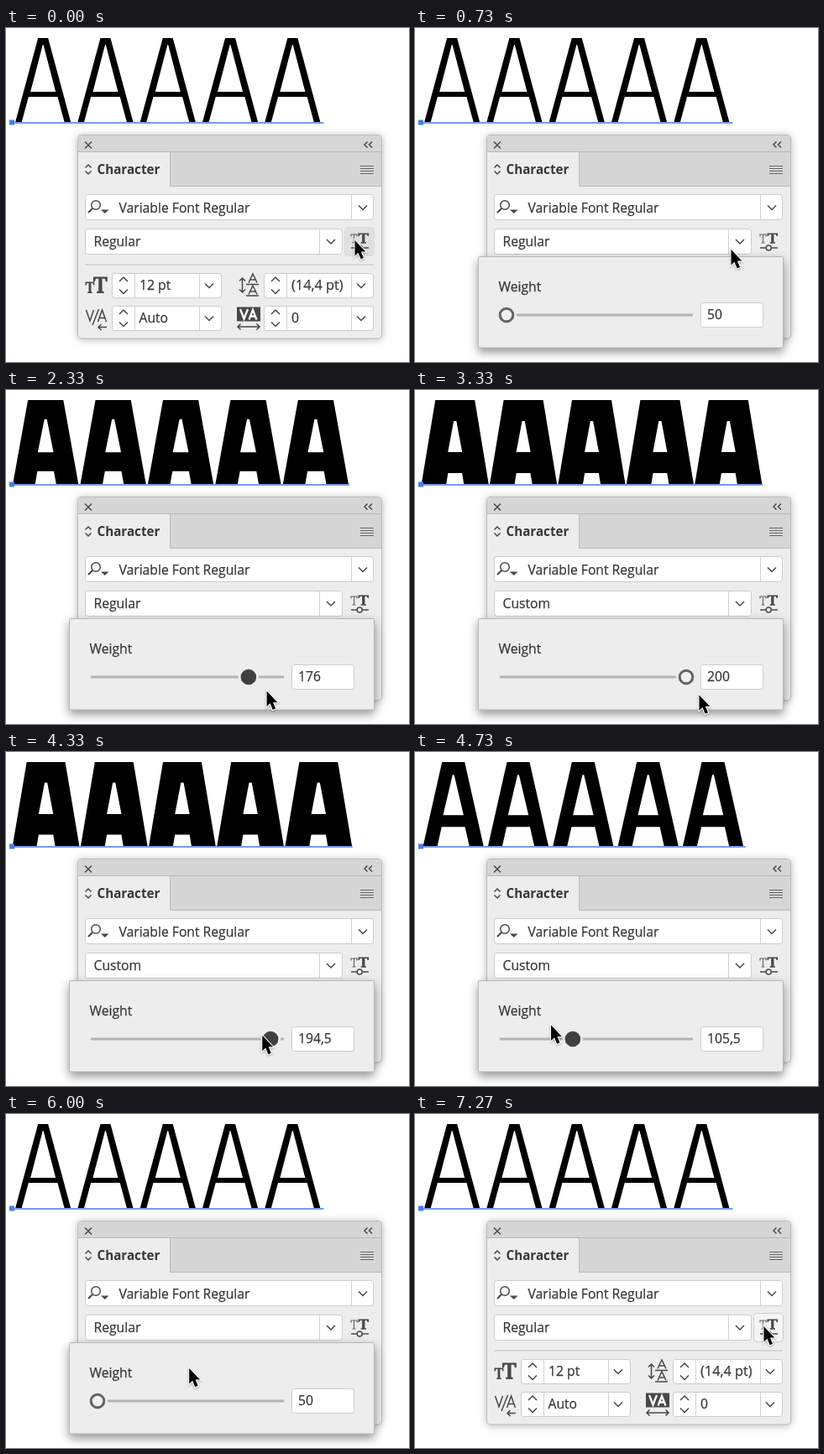
These frames come from a looping animation (480 px wide and 398 px high, 8.27 s). An HTML page:

```html
<!DOCTYPE html>
<html lang="en">
<head>
<meta charset="utf-8">
<title>Variable font weight slider</title>
<style>
  html, body { margin: 0; width: 100%; height: 100%; overflow: hidden; background: #fff; }
  svg { display: block; width: 480px; height: 398px; }
  text { font: 15.7px "Open Sans", "Noto Sans", sans-serif; fill: #383838; stroke: #383838; stroke-width: .25; }
  .bold { font-weight: 700; font-size: 15.2px; stroke: none; }
  .box { fill: #fff; stroke: #cdcdcd; }
  .rule { stroke: #d2d2d2; fill: none; }
  .line { stroke: #484848; fill: none; stroke-width: 1.5; }
  .thin { stroke: #666; stroke-width: 1.2; }
  .panel { filter: drop-shadow(0 1px 5px rgba(0, 0, 0, .28)); }
  #popup { filter: drop-shadow(0 5px 6px rgba(0, 0, 0, .42)); }
  #cursor { filter: drop-shadow(0 1px 1px rgba(0, 0, 0, .3)); }
</style>
</head>
<body>
<svg viewBox="0 0 480 398" xmlns="http://www.w3.org/2000/svg">
  <defs>
    <path id="down" class="line" d="M-5 -2.5L0 2.5L5 -2.5"/>
    <path id="slab" fill="#484848" d="M0 0H14V5H12.500L11.500 2H8.800V15H10.500V17H3.500V15H5.200V2H2.500L1.500 5H0Z"/>
    <path id="a" class="line" d="M-5 10.500L0 0L5 10.500M-3 7H3"/>
    <g id="field">
      <rect class="box" x=".5" y=".5" width="130" height="29" rx="3"/>
      <path class="rule" d="M27.500 1V29M104.500 1V29"/>
      <path class="line" d="M9 10L14 5L19 10M9 19.500L14 24.500L19 19.500"/>
      <use href="#down" x="116" y="15"/>
    </g>
  </defs>

  <path id="letters" fill-rule="evenodd"/>
  <path id="base" stroke="#4878e6" stroke-width="1.500"/>
  <rect x="4" y="109.500" width="6" height="6" fill="#4a7be8"/>

  <rect class="panel" x="85" y="127" width="363" height="243.500" rx="5" fill="#bcbcbc"/>
  <rect x="86" y="128" width="361" height="241.500" rx="4" fill="#ededed"/>
  <path d="M86 188V133Q86 128 91 128H442Q447 128 447 133V188Z" fill="#d6d6d6"/>
  <rect x="86" y="148" width="109" height="41" fill="#ededed"/>
  <path d="M86 147.500H447M195.500 148V188.500H447" stroke="#b9b9b9" fill="none"/>
  <path class="line" d="M94 135.500L102 143.500M102 135.500L94 143.500M430.500 135.500L427 139L430.500 142.500M436 135.500L432.500 139L436 142.500"/>
  <path class="line" d="M94.500 166.500L98 163L101.500 166.500M94.500 170.500L98 174L101.500 170.500"/>
  <path class="line thin" d="M422 164.500H438M422 167.500H438M422 170.500H438M422 173.500H438"/>
  <text class="bold" x="108.500" y="174">Character</text>

  <rect class="box" x="94.500" y="198.500" width="343" height="30" rx="3"/>
  <path class="rule" d="M411.500 199V228"/>
  <circle class="line" cx="107" cy="211" r="5.300"/>
  <path class="line" d="M103 215L98 220" style="stroke-width:2.200"/>
  <path d="M113 216.500H122.500L117.750 221Z" fill="#484848"/>
  <text x="134.500" y="220">Variable Font Regular</text>
  <use href="#down" x="425" y="214"/>

  <rect class="box" x="94.500" y="239.500" width="306" height="30" rx="3"/>
  <path class="rule" d="M373.500 240V269"/>
  <text id="style" x="104.500" y="260"></text>
  <use href="#down" x="387" y="254.500"/>

  <rect id="button" x="403.500" y="237.500" width="35" height="34" rx="4"/>
  <path class="line thin" d="M411 248.500V246H418V248.500M414.500 246V256M412.500 256H416.500"/>
  <use href="#slab" transform="translate(419.500 244.500) scale(.9 .72)"/>
  <path class="line" d="M411 262H418M424.500 262H432"/>
  <circle class="line" cx="421.200" cy="262" r="3"/>

  <path d="M94 282H438" stroke="#d6d6d6" stroke-width="2"/>
  <use href="#field" x="126" y="292"/>
  <use href="#field" x="307" y="292"/>
  <use href="#field" x="126" y="331"/>
  <use href="#field" x="307" y="331"/>
  <text x="159" y="312">12 pt</text>
  <text x="340" y="312" style="font-size:16.300px">(14,4 pt)</text>
  <text x="158.500" y="351">Auto</text>
  <text x="340" y="351">0</text>

  <use href="#slab" transform="translate(94.500 302.500) scale(.78 .8)"/>
  <use href="#slab" transform="translate(104 296.500) scale(1.200 1.150)"/>
  <path class="line" d="M281.500 298V315M278 301.500L281.500 298L285 301.500M278 311.500L281.500 315L285 311.500M286 305.500H301M286 319H301"/>
  <use href="#a" x="294" y="293"/>
  <use href="#a" x="294" y="307"/>
  <path class="line" d="M95.500 336L100 349L104.500 336M103 354L110.500 335M109.500 350L114.500 336L119.500 350M111.500 345.500H117.500M120 356.500H110M113.500 353L110 356.500L113.500 360"/>
  <rect x="275" y="332.500" width="28" height="17" fill="#484848"/>
  <path class="line" style="stroke:#fff;stroke-width:2.300" d="M279 335L283.500 346.500L288 335M289.500 347.500L294 336L298.500 347.500M291 343.500H297"/>
  <path class="line" d="M276 356H302M279.500 352.500L276 356L279.500 359.500M298.500 352.500L302 356L298.500 359.500"/>

  <g id="popup">
    <rect x="75.500" y="272.500" width="363" height="108.500" rx="1" fill="#ededed" stroke="#b8b8b8"/>
    <text x="99.500" y="314">Weight</text>
    <path d="M101 342H331" stroke="#b4b4b4" stroke-width="3"/>
    <g id="knob">
      <circle r="12" fill="#ededed"/>
      <circle id="dot" r="7.800" stroke-width="3"/>
    </g>
    <rect class="box" x="340.500" y="327.500" width="74" height="29" rx="3"/>
    <text id="value" x="348" y="347"></text>
  </g>

  <path id="cursor" d="M.5 1V19.500L4.500 15.700L7.600 23.300L11 21.900L7.900 14.500H13.300Z" stroke="#fff" stroke-width="2.200" paint-order="stroke"/>
</svg>
<script>
const LOOP = 8270, RATE = 15 / 1000;
const $ = id => document.getElementById(id);
const set = (id, attrs) => {
  for (const name in attrs) $(id).setAttribute(name, attrs[name]);
};

const swing = u => (1 - Math.cos(Math.PI * u)) / 2;
const settle = u => Math.sin(Math.PI * u / 2);
const progress = (k, from, to) => Math.min(1, Math.max(0, (k - from) / (to - from)));

// Each move runs between two ticks to a point; bend bows its path.
const HOME = [415, 252];
const MOVES = [
  { from: 8, to: 21, at: [105, 340] },
  { from: 25.4, to: 38.4, at: [349, 361] },
  { from: 39, to: 59, at: [318, 338], bend: [7, 15] },
  { from: 63, to: 76, at: [87, 318] },
  { from: 84, to: 107, at: HOME, bend: [0, 14], ease: settle }
];

function pointer(k) {
  let p = HOME;
  for (const { from, to, at, bend = [0, 0], ease = swing } of MOVES) {
    const u = progress(k, from, to);
    p = p.map((v, i) => v + (at[i] - v) * ease(u) + bend[i] * Math.sin(Math.PI * u));
  }
  return p;
}

// 0 is the lightest weight, 1 the heaviest
const amount = k => swing(progress(k, 25.4, 38.4)) - swing(progress(k, 63.4, 76.4));

function letters(u) {
  const s = u ** .85, mix = (a, b) => a + (b - a) * s;
  const advance = mix(74.3, 81.4), foot = mix(33, 40), top = mix(6, 23.5);
  const notch = mix(25.4, 10.5), under = mix(82, 99), bar = mix(76, 74);
  const hole = mix(15, 8.5), apex = mix(20, 37), tip = mix(.4, 1.6);
  const inner = notch - (foot - top) / 100 * (112 - under);
  let d = "";
  for (let i = 0; i < 5; i++) {
    const c = 7 + advance * (i + .5);
    d += `M${c - foot} 112L${c - top} 12H${c + top}L${c + foot} 112H${c + notch}L${c + inner} ${under}H${c - inner}L${c - notch} 112Z`
      + `M${c - hole} ${bar}H${c + hole}L${c + tip} ${apex}H${c - tip}Z`;
  }
  set("letters", { d });
  set("base", { d: `M7 113H${7 + advance * 5}` });
}

function paint(ms) {
  const k = Math.floor((ms % LOOP + 5) * RATE);
  const within = (a, b) => k >= a && k < b;
  const [x, y] = pointer(k), u = amount(k);
  const weight = Math.round((50 + 150 * u) * 2) / 2;

  letters(u);
  set("cursor", { transform: `translate(${x} ${y})` });
  $("popup").style.display = within(3, 109) ? "" : "none";
  $("style").textContent = within(41, 85) ? "Custom" : "Regular";
  $("value").textContent = String(weight).replace(".", ",");

  const held = within(22, 39) || within(59, 83);
  set("knob", { transform: `translate(${109 + u * 214} 342)` });
  set("dot", held ? { fill: "#404040", stroke: "#404040" } : { fill: "#f0f0f0", stroke: "#646464" });

  const over = x > 403 && x < 439 && y > 237 && y < 272;
  set("button", k < 3 ? { fill: "#e0e0e0", stroke: "#dcdcdc" }
    : over ? { fill: "#f5f5f5", stroke: "#cdcdcd" }
    : { fill: "none", stroke: "none" });
}

const start = performance.now();
function loop() {
  paint(performance.now() - start);
  requestAnimationFrame(loop);
}
loop();
</script>
</body>
</html>
```
